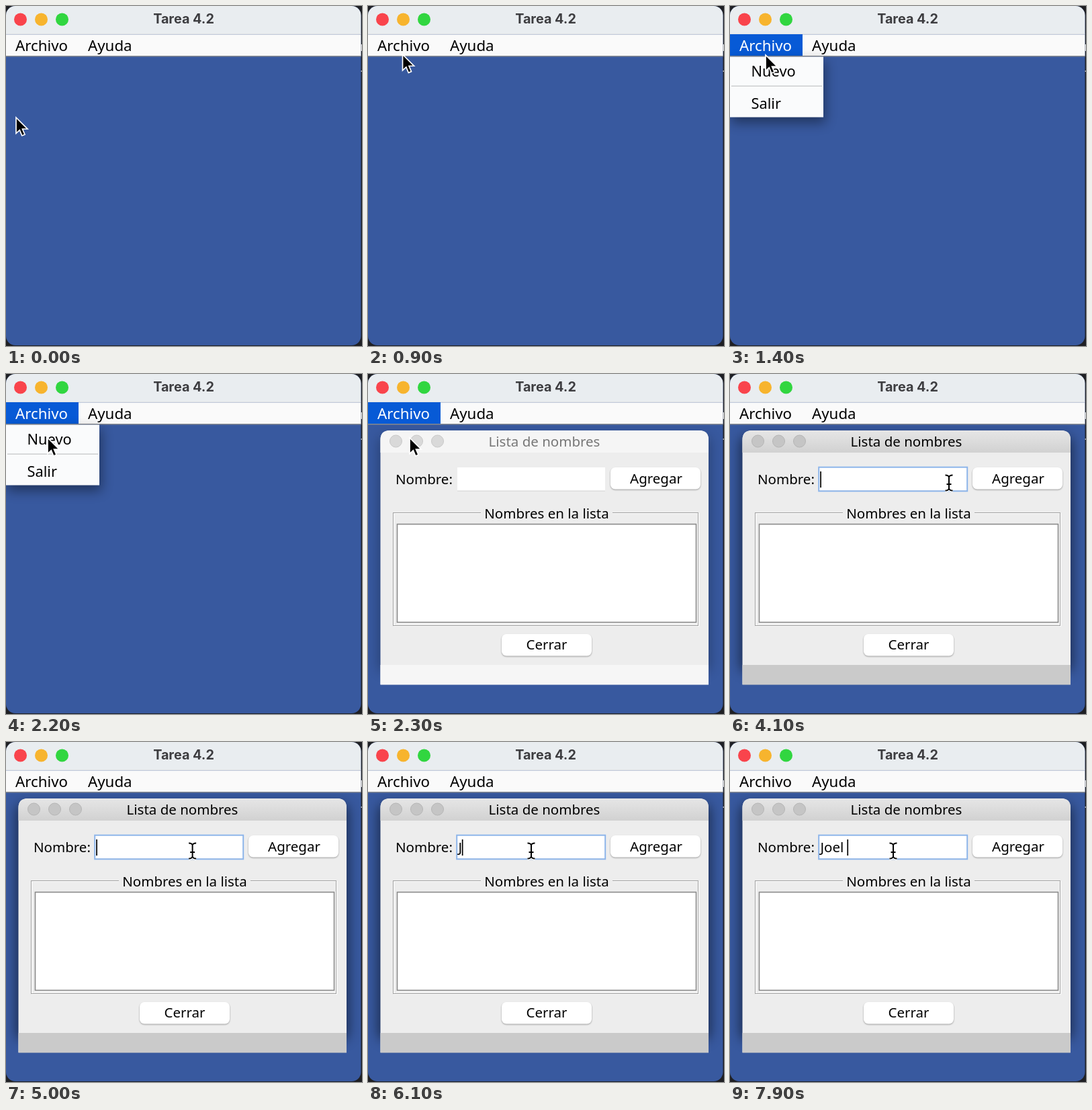
An HTML page that plays this animation: 530 px wide and 506 px high, repeating every 8000 ms.

```html
<!DOCTYPE html>
<html lang="es">
<head>
<meta charset="utf-8">
<style>
html, body { margin: 0; height: 100%; overflow: hidden; background: #1f2024; }
svg { display: block; width: 530px; height: 506px; font: 20.5px "Noto Sans", "Open Sans", sans-serif; }
.menu { font-size: 22.3px; }
.mid { text-anchor: middle; }
.title { font: 700 19.8px Inter, sans-serif; fill: #3d3d40; }
</style>
</head>
<body>
<svg viewBox="0 0 530 506">
  <defs>
    <linearGradient id="bar" x2="0" y2="1">
      <stop stop-color="#e6e6e6"/><stop offset="1" stop-color="#d1d1d1"/>
    </linearGradient>
    <filter id="soft" x="-30%" y="-30%" width="160%" height="160%"><feGaussianBlur stdDeviation="9"/></filter>
    <filter id="thin" x="-10%" y="-20%" width="120%" height="150%"><feGaussianBlur stdDeviation="1"/></filter>
    <clipPath id="win"><rect width="528.5" height="505" rx="14"/></clipPath>
  </defs>

  <g clip-path="url(#win)">
    <rect width="530" height="506" fill="#38599f"/>
    <rect width="530" height="42" fill="#e9edf0"/>
    <rect y="41.5" width="530" height="1" fill="#d9dcde"/>
    <rect y="42.5" width="530" height="32" fill="#fafafa"/>
    <rect y="74" width="530" height="1.5" fill="#858990"/>
    <circle cx="21.5" cy="20" r="9.5" fill="#f9444c"/>
    <circle cx="52.5" cy="20" r="9.5" fill="#f7b42e"/>
    <circle cx="83.5" cy="20" r="9.5" fill="#31d640"/>
    <text class="title mid" x="264.5" y="26">Tarea 4.2</text>
    <rect id="hot" y="42" width="108" height="32" fill="#075ad6"/>
    <g class="menu">
      <text id="file" x="14" y="67">Archivo</text>
      <text x="122" y="67">Ayuda</text>
    </g>

    <g id="popup">
      <rect x="2" y="82" width="140" height="92" opacity=".4" filter="url(#soft)"/>
      <rect y="75.5" width="139" height="90" fill="#fafbfc"/>
      <rect x="2" y="118.5" width="135" height="1.3" fill="#c6c7c9"/>
      <g class="menu" style="font-size:21.8px">
        <text x="31.5" y="105">Nuevo</text>
        <text x="31.5" y="153">Salir</text>
      </g>
    </g>

    <g id="dialog">
      <rect id="shade" x="15" y="92" width="495" height="352" rx="12" filter="url(#soft)"/>
      <path d="M18.5 462V98q0-14 14-14H493q14 0 14 14V462z" fill="#ededed"/>
      <path id="head" d="M18.5 117V98q0-14 14-14H493q14 0 14 14V117z"/>
      <rect id="foot" x="18.5" y="433" width="488.5" height="29.5"/>
      <g id="dots" stroke-width="1">
        <circle cx="41.5" cy="100" r="9"/><circle cx="72.5" cy="100" r="9"/><circle cx="103.5" cy="100" r="9"/>
      </g>
      <text id="name" class="mid" x="262.5" y="108">Lista de nombres</text>
      <text x="41" y="164">Nombre:</text>
      <rect x="133" y="139" width="220" height="35" fill="#fff"/>
      <path d="M133 174H353" stroke="#d2d2d2"/>
      <rect id="ring" x="132.2" y="138.7" width="221" height="35.6" fill="none" stroke="#8db5ea" stroke-width="2"/>
      <text id="typed" x="134.5" y="164" xml:space="preserve"></text>
      <rect id="caret" y="145" width="1.7" height="24"/>

      <g fill="none">
        <rect x="38.5" y="207.5" width="454" height="168" stroke="#fff"/>
        <rect x="37.5" y="206.5" width="454" height="168" stroke="#a0a0a0"/>
      </g>
      <rect x="168" y="203" width="196" height="8" fill="#ededed"/>
      <text class="mid" x="266" y="215">Nombres en la lista</text>
      <rect x="43.5" y="223.5" width="445" height="146" fill="#fff" stroke="#8a8a8a" stroke-width="1.6"/>
      <path d="M42.5 371.5H490.5V222" fill="none" stroke="#fff"/>

      <g opacity=".35" filter="url(#thin)">
        <rect x="361" y="140.5" width="134" height="32" rx="7"/>
        <rect x="199" y="388.5" width="134" height="32" rx="7"/>
      </g>
      <g fill="#fff">
        <rect x="361" y="139" width="134" height="32.5" rx="7"/>
        <rect x="199" y="387" width="134" height="32.5" rx="7"/>
      </g>
      <text class="mid" x="429" y="163">Agregar</text>
      <text class="mid" x="266" y="410">Cerrar</text>
    </g>
  </g>
  <path d="M528.5 57H530V67H528.5z" fill="#d8d8d8"/>
  <path d="M528.5 96H530V98H528.5z" fill="#aaa"/>

  <path id="arrow" d="M0 0V23.5L5.3 18.6L8.8 27L13 25.2L9.5 17H17z" stroke="#fff" stroke-width="1.7"/>
  <g id="beam" fill="none">
    <path id="bar-shape" d="M-5.5-11.5Q-1-11.5 0-8.5Q1-11.5 5.5-11.5M0-8.5V8.5M-5.5 11.5Q-1 11.5 0 8.5Q1 11.5 5.5 11.5M-3.5 2H3.5" stroke="#fff" stroke-width="4"/>
    <use href="#bar-shape"/>
    <path d="M-5.5-11.5Q-1-11.5 0-8.5Q1-11.5 5.5-11.5M0-8.5V8.5M-5.5 11.5Q-1 11.5 0 8.5Q1 11.5 5.5 11.5M-3.5 2H3.5" stroke="#000" stroke-width="2"/>
  </g>
</svg>
<script>
const LOOP = 8000, STEP = 100;
const OPEN = 1000, PICK = 2300, FOCUS = 2400;
const WORD = "Joel ", TYPE = 6000, KEY_GAP = 400;
// time, x, y of the pointer
const PATH = [
  [0, 15, 166], [700, 51, 72], [1300, 53, 73], [1500, 53, 73], [2100, 62, 95],
  [2400, 62, 95], [3500, 326, 162], [4500, 326, 162], [5400, 243, 162], [LOOP, 243, 162]
];
const $ = id => document.getElementById(id);
const show = (id, on) => $(id).style.display = on ? "" : "none";
const set = (id, attrs) => { for (const k in attrs) $(id).setAttribute(k, attrs[k]); };

function pointer(t) {
  const i = PATH.findIndex(p => p[0] > t);
  const [t0, x0, y0] = PATH[i - 1], [t1, x1, y1] = PATH[i];
  const u = (t - t0) / (t1 - t0), e = u * u * (3 - 2 * u);
  return [x0 + (x1 - x0) * e, y0 + (y1 - y0) * e];
}

function draw(t) {
  const focus = t >= FOCUS, hot = t >= OPEN && !focus;
  show("hot", hot);
  set("file", { fill: hot ? "#fff" : "#000" });
  show("popup", t >= OPEN && t < PICK);
  show("dialog", t >= PICK);
  set("shade", { opacity: focus ? .5 : .25 });
  set("head", { fill: focus ? "url(#bar)" : "#f5f5f5" });
  set("foot", { fill: focus ? "#cacaca" : "#f6f6f6" });
  set("dots", { fill: focus ? "#c5c5c5" : "#d9d9d9", stroke: focus ? "#b5b5b5" : "#c8c8c8" });
  set("name", { fill: focus ? "#000" : "#777" });
  show("ring", focus);

  const keys = Math.max(0, Math.min(WORD.length, Math.floor((t - TYPE) / KEY_GAP) + 1));
  $("typed").textContent = WORD.slice(0, keys);
  const since = keys ? t - TYPE - (keys - 1) * KEY_GAP : t;
  show("caret", focus && since % 1000 < 500);
  set("caret", { x: 134.2 + (keys ? $("typed").getComputedTextLength() : 0) });

  const [x, y] = pointer(t);
  const text = focus && x > 132 && x < 354 && y > 138 && y < 175;
  show("arrow", !text);
  show("beam", text);
  set(text ? "beam" : "arrow", { transform: `translate(${x} ${y})` });
}

function tick() {
  const t = performance.now() % LOOP;
  draw(Math.floor(t / STEP) * STEP);
  requestAnimationFrame(tick);
}
tick();
</script>
</body>
</html>
```
